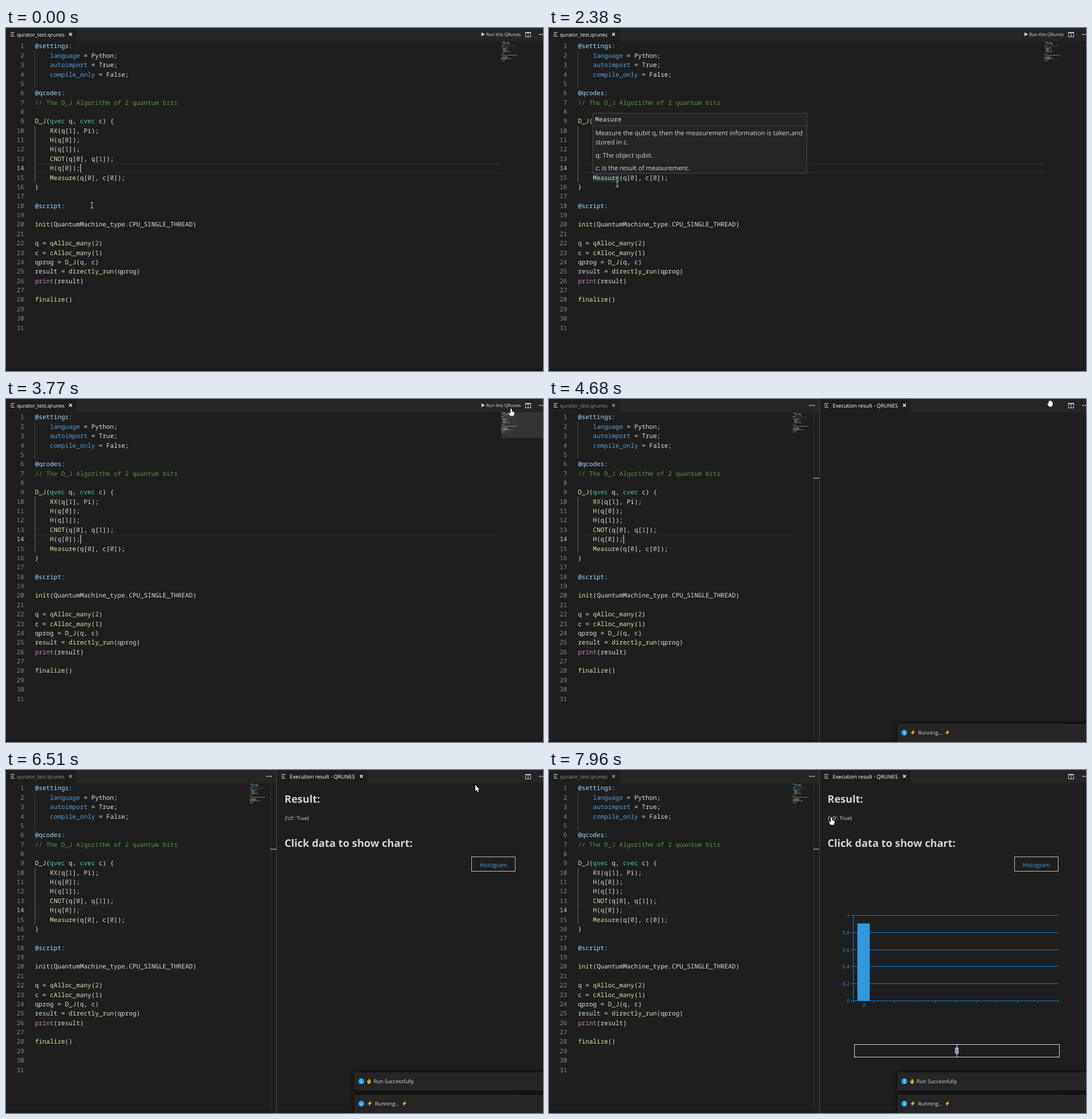
Recreate the animation shown at these times as an HTML page with a canvas. Size 936 by 598 pixels, loop 8000 ms.

```html
<!DOCTYPE html>
<html lang="en">
<head>
<meta charset="utf-8">
<title>QRunes editor</title>
<style>
html, body { margin: 0; width: 100%; height: 100%; overflow: hidden; background: #1e1e1e; }
canvas { display: block; width: 936px; height: 598px; }
</style>
</head>
<body>
<canvas id="stage"></canvas>
<script>
const W = 936, H = 598, LOOP = 8000;
const canvas = document.getElementById('stage');
const dpr = window.devicePixelRatio || 1;
canvas.width = W * dpr;
canvas.height = H * dpr;
const ctx = canvas.getContext('2d');

const MONO = '"Noto Sans Mono", "DejaVu Sans Mono", monospace';
const SANS = '"Open Sans", "Noto Sans", sans-serif';
const BG = '#1e1e1e', BAR = '#252526', FG = '#dcdcdc';
const CHAR = 6.55, LINE = 16.37, TOP = 23.2, LEFT = 50.4;

const code = `@settings:
    language = Python;
    autoimport = True;
    compile_only = False;

@qcodes:
// The D_J Algorithm of 2 quantum bits

D_J(qvec q, cvec c) {
    RX(q[1], Pi);
    H(q[0]);
    H(q[1]);
    CNOT(q[0], q[1]);
    H(q[0]);
    Measure(q[0], c[0]);
}

@script:

init(QuantumMachine_type.CPU_SINGLE_THREAD)

q = qAlloc_many(2)
c = cAlloc_many(1)
qprog = D_J(q, c)
result = directly_run(qprog)
print(result)

finalize()


`.split('\n');

const rules = [
  [/^\/\/.*/, '#608b4e'],
  [/^@\w+:/, '#9cdcfe'],
  [/^(language|autoimport|compile_only)\b/, '#569cd6'],
  [/^(qvec|cvec)\b/, '#4ec9b0'],
  [/^print\b/, '#c586c0'],
  [/^\w+(?=\()/, '#dcdcaa'],
  [/^\d+/, '#b5cea8'],
  [/^\w+/, FG],
  [/^[^\w\s]/, FG]
];

// Splits a line into words with their column and colour.
function tokenize(line) {
  const out = [];
  for (let col = 0; col < line.length;) {
    const rest = line.slice(col);
    const rule = rules.find(r => r[0].test(rest));
    const text = rule ? rest.match(rule[0])[0] : rest[0];
    if (rule) out.push({ col, text, color: rule[1] });
    col += text.length;
  }
  return out;
}
const tokens = code.map(tokenize);

function rect(x, y, w, h, color) {
  ctx.fillStyle = color;
  ctx.fillRect(x, y, w, h);
}

function frame(x, y, w, h, color) {
  ctx.strokeStyle = color;
  ctx.lineWidth = 1;
  ctx.strokeRect(x, y, w, h);
}

function label(text, x, y, size, color, { font = SANS, align = 'left', weight = 400 } = {}) {
  ctx.font = `${weight} ${size}px ${font}`;
  ctx.textAlign = align;
  ctx.fillStyle = color;
  ctx.fillText(text, x, y);
}

function mono(text, x, y, color, align) {
  label(text, x, y, CHAR / 0.6, color, { font: MONO, weight: 500, align });
}

function path(points, color, width = 1) {
  ctx.beginPath();
  points.forEach(([x, y], i) => i ? ctx.lineTo(x, y) : ctx.moveTo(x, y));
  ctx.strokeStyle = color;
  ctx.lineWidth = width;
  ctx.stroke();
}

function shape(d, x, y, fill, stroke) {
  const p = new Path2D(d);
  ctx.save();
  ctx.translate(x, y);
  if (stroke) {
    ctx.strokeStyle = stroke;
    ctx.lineWidth = 1.4;
    ctx.stroke(p);
  }
  ctx.fillStyle = fill;
  ctx.fill(p);
  ctx.restore();
}

function dots(x, n) {
  for (let i = 0; i < n; i++) rect(x + i * 3.8, 10.2, 2, 2, '#c5c5c5');
}

function tab(x, w, title, size, color, closeX) {
  rect(x, 0, w, 23, BG);
  [[7, 7.2], [5, 10.4], [7, 13.6]].forEach(([len, y]) => rect(x + 8, y, len, 1.2, '#c5c5c5'));
  label(title, x + (x ? 22.5 : 19), 14.6, size, color);
  path([[closeX - 2.4, 8.6], [closeX + 2.4, 13.4]], color, 1.4);
  path([[closeX + 2.4, 8.6], [closeX - 2.4, 13.4]], color, 1.4);
}

function topBar(split) {
  rect(0, 0, W, 23, BAR);
  tab(0, 123, 'qurator_test.qrunes', 8.95, split ? '#969696' : '#fff', 112.5);
  if (split) {
    dots(453.5, 3);
    tab(472, 158, 'Execution result - QRUNES', 9.25, '#fff', 619.5);
  } else {
    shape('M0 0L6.5 3.5L0 7Z', 828.6, 7.6, '#ccc');
    label('Run this QRunes', 837, 14, 7.8, '#dcdcdc');
  }
  frame(905.5, 7.5, 9, 8, '#c5c5c5');
  rect(905, 7, 10, 2, '#c5c5c5');
  rect(909.5, 8, 1, 8, '#c5c5c5');
  dots(929.6, 2);
}

function minimap(x, hovered) {
  if (hovered) rect(x, 23, W - x, 45, '#343434');
  ctx.globalAlpha = 0.55;
  tokens.forEach((line, i) => line.forEach(k =>
    rect(x + k.col * 0.63, 24 + i * 1.22, k.text.length * 0.63, 0.8, k.color)));
  ctx.globalAlpha = 1;
}

function editor(right, caret, hovered, word) {
  const row = n => TOP + (n - 1) * LINE;
  rect(50, 236, right - 50, 1, '#2c2c2c');
  rect(50, 251.6, right - 50, 1, '#2c2c2c');
  rect(50, row(2), 1, 4 * LINE, '#404040');
  rect(50, row(10), 1, 6 * LINE, '#646464');
  if (word) rect(76.5, 253, 46, 16, '#1f2d3a');
  tokens.forEach((line, i) => {
    const y = row(i + 1) + 12.2;
    mono(String(i + 1), 31.6, y, i === 13 ? '#c6c6c6' : '#858585', 'right');
    line.forEach(k => mono(k.text, LEFT + k.col * CHAR, y, k.color));
  });
  if (caret) rect(129.5, 237, 1.2, 15, '#d8d8d8');
  minimap(right, hovered);
}

function hoverCard(alpha) {
  ctx.globalAlpha = alpha;
  rect(76, 148, 374, 106, BAR);
  frame(76.5, 148.5, 373, 105, '#454545');
  rect(77, 170, 372, 1, '#3a3a3b');
  mono('Measure', 80.6, 163.2, FG);
  [['Measure the qubit q, then the measurement information is taken,and', 187],
   ['stored in c.', 203], ['q: The object qubit.', 225.5], ['c: is the result of measurement.', 247.5]]
    .forEach(([s, y]) => label(s, 81, y, 11.18, '#d4d4d4'));
  ctx.globalAlpha = 1;
}

const BOLT = 'M1.2 -4.2L-3.8 .8H-.8L-1.8 4.2L3.8 -1H.8L2.4 -4.2Z';

function toast(y, text, done) {
  ctx.save();
  ctx.shadowColor = '#000';
  ctx.shadowBlur = 6 * dpr;
  rect(607, y, 340, 32, BAR);
  ctx.restore();
  const cy = y + 15.6;
  ctx.beginPath();
  ctx.arc(619.3, cy, 5.2, 0, 7);
  ctx.fillStyle = '#1b9fe0';
  ctx.fill();
  rect(618.7, cy - 3, 1.3, 1.3, '#fff');
  rect(618.7, cy - 0.9, 1.3, 4, '#fff');
  if (done) {
    shape('M-2.8 -.6Q-2 -2 -.4 -.8L-.2 -4.4H.9L1.2 -1L2.2 -3L3 0Q3.2 4.6 .4 4.6Q-2.6 4.4 -2.8 1Z', 632.5, cy, '#f5b83d');
    rect(631, cy + 0.6, 1.5, 1.5, '#6b4a12');
  } else {
    shape(BOLT, 634, cy, '#fbb02d');
    shape(BOLT, 694.3, cy, '#fbb02d');
  }
  label(text, done ? 640.8 : 643.2, cy + 3.5, 9.1, '#d8d8d8');
}

function result() {
  label('Result:', 485.6, 57.4, 18, '#d4d4d4', { weight: 700 });
  label("{'c0': True}", 486, 87, 8.8, '#dcdcdc');
  label('Click data to show chart:', 485.4, 133.5, 18.15, '#d4d4d4', { weight: 700 });
  frame(811.5, 151.5, 76, 25, '#c0c0c0');
  label('Histogram', 849.6, 168.8, 9.85, '#4a9edb', { align: 'center' });
}

function chart(value) {
  const blue = '#0c7cd0', x0 = 530.5, x1 = 888, base = 402.5, height = 149;
  for (let i = 0; i <= 5; i++) {
    const y = Math.floor(base - height * i / 5) + 0.5;
    path([[x0 - 4, y], [x1, y]], blue);
    label(String(i / 5), 524.2, y + 3.2, 9.2, '#1a8ce4', { align: 'right' });
  }
  path([[x0, 253], [x0, base]], blue);
  for (let i = 0; i <= 10; i++) {
    const x = x0 + (x1 - x0) * i / 10;
    path([[x, base], [x, base + 3.5]], blue);
  }
  rect(537.5, 402 - height * value, 21.5, height * value, '#3398db');
  ctx.save();
  ctx.translate(549, 410);
  ctx.rotate(Math.PI / 4);
  label('0', 0, 3, 9.2, '#1a8ce4', { align: 'center' });
  ctx.restore();
  frame(532.5, 478.5, 357, 22, '#d2d6da');
  rect(710.3, 478, 1.2, 22, '#c4d0dc');
  rect(707.8, 484, 6.2, 10.5, '#a7b7cc');
  rect(709.2, 487, 3.4, 1, '#404a55');
  rect(709.2, 490.5, 3.4, 1, '#404a55');
}

// Bar growth: cubic ease-out, seen in held steps.
function barValue(t) {
  const held = Math.floor((t - 7690) / 135) * 135;
  return 1 - Math.pow(1 - held / 500, 3);
}

const pointers = {
  beam(x, y) {
    path([[x - 2.4, y - 4.8], [x + 2.4, y - 4.8]], '#cfcfcf');
    path([[x, y - 4.8], [x, y + 4.8]], '#cfcfcf');
    path([[x - 2.4, y + 4.8], [x + 2.4, y + 4.8]], '#cfcfcf');
  },
  arrow(x, y) {
    shape('M0 0V11L2.6 8.8L4.4 12.8L6 12L4.3 8.2H7.6Z', x, y, '#fff', '#000');
  },
  hand(x, y) {
    shape('M-1.2 1Q0 -.8 1.2 1V5L4.6 5.9Q6 6.4 5.7 8L4.6 13H-1.6L-4.2 8.8Q-4.6 7 -3.2 7.3L-1.2 9Z', x, y, '#fff', '#000');
  },
  palm(x, y) {
    shape('M-2.8 6V2L-1.5 1.6L-1.2 4.5V.8L.4 .5L.7 4.5L1 .8L2.4 1L2.5 5L3.2 2.4L4.6 2.8L4.2 8.5L3 11.6H-1.6L-5 7.4L-4.2 6Z', x, y, '#fff', '#000');
  }
};

// Pointer moves: held until the next time.
const moves = [
  [0, 149.8, 309, 'beam'],
  [530, 147, 306, 'beam'], [670, 139, 296, 'beam'], [800, 127, 282, 'beam'],
  [940, 117, 271, 'beam'], [1080, 110, 264, 'beam'], [1210, 108, 262, 'beam'],
  [2380, 119, 272, 'beam'], [2520, 150, 293, 'beam'], [2660, 212, 311, 'beam'],
  [2800, 318, 314, 'beam'], [2930, 470, 284, 'beam'], [3070, 622, 228, 'beam'],
  [3210, 752, 164, 'beam'], [3350, 836, 118, 'beam'],
  [3500, 862, 68, 'beam'], [3640, 879, 36, 'arrow'], [3770, 880.5, 16.5, 'hand'],
  [3890, 879, 11, 'hand'], [4010, 877, 8, 'hand'], [4680, 873.5, 2, 'palm'],
  [6360, 862, 12, 'arrow'], [6500, 818, 26, 'arrow'], [6630, 738, 47, 'arrow'],
  [6760, 642, 68, 'arrow'], [6900, 562, 84, 'arrow'], [7030, 512, 92, 'arrow'],
  [7160, 494, 92, 'arrow'], [7290, 491, 86, 'hand'], [7440, 492.3, 82.5, 'hand']
];

function pointer(t) {
  const [, x, y, kind] = moves.filter(m => m[0] <= t).pop();
  pointers[kind](x, y);
}

function caretOn(t) {
  if (t >= 3750) return t < 4950;
  return Math.floor((t + 250) / 500) % 2 === 0;
}

function draw(t) {
  ctx.setTransform(dpr, 0, 0, dpr, 0, 0);
  ctx.textRendering = 'geometricPrecision';
  const split = t >= 4680;
  const card = t >= 1600 && t < 2520;
  rect(0, 0, W, H, BG);
  topBar(split);
  editor(split ? 425 : 863.5, caretOn(t), t >= 3640 && t < 4010, card);
  rect(0, 594, W, 4, '#191919');
  if (card) hoverCard(t < 1720 ? 0.6 : 1);
  if (split) {
    rect(461, 23, 1, 571, '#303031');
    if (t >= 4810 && t < 5630) {
      rect(461, 24, 10, 153, '#3a3a3a');
      rect(461, 177, 10, 160, '#424242');
    }
    rect(461, 137.4, 10, 1.4, '#a0a0a0');
    rect(471, 0, 1, H, '#444');
  }
  if (t >= 5350) result();
  if (t >= 7690) chart(barValue(t));
  if (t >= 4390) {
    if (t >= 4950) toast(527, 'Run Successfully', true);
    toast(566, 'Running...', false);
    rect(897, 563.6, 39, 1.6, '#0c0c0c');
  }
  pointer(t);
}

function tick() {
  draw(performance.now() % LOOP);
  requestAnimationFrame(tick);
}
tick();
</script>
</body>
</html>
```
